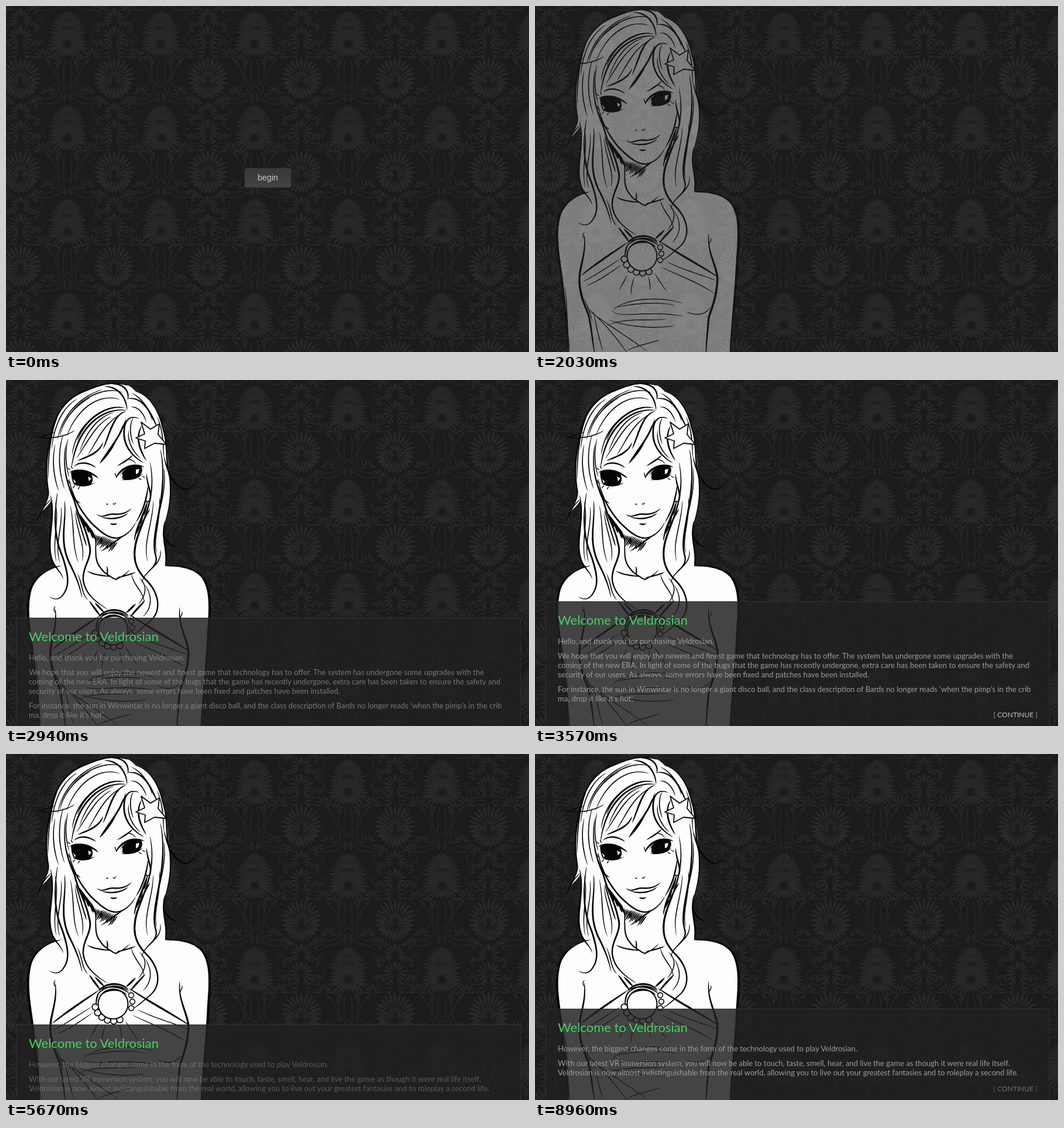
Animation, 894 px wide and 591 px high, one loop 9.03 s. Source, as an HTML page:

```html
<!DOCTYPE html>
<html lang="en">
<head>
<meta charset="utf-8">
<title>Welcome</title>
<style>
  html, body { margin: 0; width: 100%; height: 100%; overflow: hidden; background: #1b1b1b; }
  #stage { position: absolute; left: 0; top: 0; width: 894px; height: 591px; overflow: hidden; }
  svg { position: absolute; left: 0; top: 0; }
  #begin {
    position: absolute; left: 408px; top: 277px; width: 79px; height: 33px; border-radius: 4px;
    background: linear-gradient(#383838, #434343); color: #c6c6c6; text-align: center;
    font: 14.4px/33px "Liberation Sans", Arial, sans-serif;
  }
  #panel {
    position: absolute; left: 18px; width: 862px; height: 240px; box-sizing: border-box;
    border: 1px solid #303030; background: rgba(33, 33, 33, .84);
    font: 13px/16px Lato, sans-serif; color: #9c9c9c; white-space: nowrap;
  }
  h1 { position: absolute; left: 20px; top: 18px; margin: 0; font: 22px/26px Lato, sans-serif; color: #45d163; }
  .page { position: absolute; left: 20px; top: 59px; }
  p { margin: 0 0 9px; }
  #next { position: absolute; right: 35px; top: 564px; font: 12px/16px Lato, sans-serif; color: #999; }
  #next b { font-weight: normal; color: #ccc; }
  #next.hover, #next.hover b { color: #fff; }
</style>
</head>
<body>
<div id="stage">
  <svg width="894" height="591">
    <defs>
      <g id="half"></g>
      <g id="motif">
        <use href="#half"/>
        <use href="#half" transform="translate(160) scale(-1 1)"/>
      </g>
      <pattern id="damask" x="25" y="0" width="160" height="160" patternUnits="userSpaceOnUse">
        <use href="#motif"/>
        <use href="#motif" y="-160"/>
        <use href="#motif" y="160"/>
      </pattern>
      <pattern id="weave" width="4" height="4" patternUnits="userSpaceOnUse">
        <path d="M0 0h1v1h-1zM2 2h1v1h-1z" fill="#111" opacity=".45"/>
      </pattern>
    </defs>
    <rect width="894" height="591" fill="#1c1c1c"/>
    <rect width="894" height="591" fill="url(#damask)"/>
    <rect width="894" height="591" fill="url(#weave)"/>
    <g id="girl">
      <path fill="#fdfdfd" d="M205 9C185 2 160 8 140 17C105 28 85 55 78 90C70 125 66 155 73 192C71 206 66 216 62 224
        C70 216 76 210 78 204C84 240 70 270 78 300C80 310 84 316 88 320C62 322 45 342 40 362C34 390 40 430 46 470
        C50 510 55 550 57 592L333 592C336 540 344 480 346 430C350 390 350 355 336 335C322 320 300 318 272 318
        C276 290 268 270 270 250C280 220 284 200 280 165C276 140 278 110 268 80C262 50 240 22 222 20C215 12 210 9 205 9Z"/>
      <g id="ink" fill="#050505"></g>
    </g>
  </svg>
  <div id="begin">begin</div>
  <div id="panel">
    <h1>Welcome to Veldrosian</h1>
    <div class="page">
      <p>Hello, and thank you for purchasing Veldrosian.</p>
      <p>We hope that you will enjoy the newest and finest game that technology has to offer. The system has undergone some upgrades with the<br>
        coming of the new ERA. In light of some of the bugs that the game has recently undergone, extra care has been taken to ensure the safety and<br>
        security of our users. As always, some errors have been fixed and patches have been installed.</p>
      <p>For instance, the sun in Winwintar is no longer a giant disco ball, and the class description of Bards no longer reads ‘when the pimp’s in the crib<br>
        ma, drop it like it’s hot’.</p>
    </div>
    <div class="page">
      <p>However, the biggest changes come in the form of the technology used to play Veldrosian.</p>
      <p>With our latest VR immersion system, you will now be able to touch, taste, smell, hear, and live the game as though it were real life itself.<br>
        Veldrosian is now almost indistinguishable from the real world, allowing you to live out your greatest fantasies and to roleplay a second life.</p>
    </div>
  </div>
  <div id="next">[ <b>CONTINUE</b> ]</div>
</div>
<script>
const $ = id => document.getElementById(id);
const NS = 'http://www.w3.org/2000/svg';
const add = (parent, tag, attrs) => {
  const el = document.createElementNS(NS, tag);
  for (const k in attrs) el.setAttribute(k, attrs[k]);
  return parent.appendChild(el);
};

// Wallpaper: fans of leaves, left half of one tile
const leaf = (x, y, deg, len, w) => {
  const a = deg * Math.PI / 180, c = Math.cos(a), s = -Math.sin(a);
  const mx = x + c * len * .6, my = y + s * len * .6;
  return `M${x} ${y}Q${mx - s * w} ${my + c * w} ${x + c * len} ${y + s * len}Q${mx + s * w} ${my - c * w} ${x} ${y}`;
};
const fan = (x, y, from, to, n, l0, l1, w, gap = 5) => {
  let d = '';
  for (let i = 0; i < n; i++) {
    const u = i / (n - 1), deg = from + (to - from) * u, a = deg * Math.PI / 180;
    d += leaf(x + gap * Math.cos(a), y - gap * Math.sin(a), deg, l0 + (l1 - l0) * u, w);
  }
  return d;
};
const bloom =
  fan(80, 64, 90, 196, 10, 22, 31, 4.2) + fan(80, 46, 96, 178, 7, 16, 25, 4, 9) + fan(80, 32, 90, 172, 6, 14, 17, 3.6, 8) +
  fan(80, 20, 90, 200, 5, 8, 8, 3, 3) + fan(80, 66, 200, 262, 5, 30, 16, 4) +
  fan(0, 124, 90, -90, 13, 24, 20, 4.6, 14) + fan(0, 136, 40, -80, 8, 18, 12, 4, 12) + fan(0, 124, 78, -50, 6, 12, 12, 3, 3);
const sprigs =
  fan(0, 22, 85, -40, 6, 13, 14, 3.4) + fan(0, 54, 85, -60, 7, 16, 17, 3.4) + fan(0, 78, 60, -40, 4, 12, 14, 3) +
  fan(24, 36, 150, -60, 6, 9, 9, 2.6, 2) + fan(27, 66, 190, 10, 6, 9, 9, 2.6, 2) + fan(20, 8, 170, -40, 6, 9, 10, 2.8, 2) +
  fan(38, 86, 190, -40, 8, 12, 14, 3.2, 3) + fan(58, 94, 130, -60, 6, 10, 12, 3, 2) +
  fan(46, 150, 170, 0, 6, 11, 12, 3.2, 3) + fan(28, 162, 200, 10, 6, 9, 9, 2.8, 2) + fan(80, 156, 130, 230, 4, 8, 9, 2.6, 2);
add($('half'), 'path', { fill: '#292929', d: bloom + sprigs });
add($('half'), 'path', { fill: 'none', stroke: '#272727', 'stroke-width': 1.6, d:
  'M70 90C58 106 64 124 70 134M76 92C70 112 76 122 72 138M34 156C52 164 68 152 66 138C64 128 52 134 57 142' +
  'M80 136C72 138 72 150 64 156M12 30C26 24 32 40 22 44M14 72C28 80 34 70 28 62M8 84C18 90 30 84 40 88' +
  'M44 96C58 100 60 120 64 130M30 164C44 172 58 166 70 158M34 12C44 20 34 30 28 24M32 50C44 50 42 64 34 62' });

// Ink: every stroke is a tapered brush line
const probe = document.createElementNS(NS, 'path');
const brush = (d, w) => {
  probe.setAttribute('d', d);
  const len = probe.getTotalLength(), n = Math.max(6, Math.ceil(len / 5)), left = [], right = [];
  for (let i = 0; i <= n; i++) {
    const u = i / n, p = probe.getPointAtLength(u * len);
    const a = probe.getPointAtLength(Math.max(0, u * len - 1)), b = probe.getPointAtLength(Math.min(len, u * len + 1));
    const h = Math.hypot(b.x - a.x, b.y - a.y) || 1;
    const r = (.25 + w * Math.sqrt(Math.sin(Math.PI * u) + 1e-9)) / 2;
    const nx = (a.y - b.y) / h * r, ny = (b.x - a.x) / h * r;
    left.push([p.x + nx, p.y + ny]);
    right.unshift([p.x - nx, p.y - ny]);
  }
  return 'M' + left.concat(right).map(q => q.map(v => v.toFixed(1)).join(' ')).join('L') + 'Z';
};
const ink = (w, d) => add($('ink'), 'path', { d: d.split('M').slice(1).map(s => brush('M' + s, w)).join('') });
const hatch = (x, y, dx, dy, lx, ly, n) => {
  let d = '';
  for (let i = 0; i < n; i++) d += `M${x + dx * i} ${y + dy * i}l${lx * (1 - .3 * (i % 3) / 2)} ${ly * (1 - .3 * (i % 3) / 2)}`;
  return d;
};
const dot = (cx, cy, r, w) => add($('ink'), 'circle', { cx, cy, r, fill: '#fdfdfd', stroke: '#050505', 'stroke-width': w });

// Shoulders and arms
ink(4, `M96 317C66 322 46 340 41 362C33 395 41 430 46 470C51 510 55 550 58 596
  M272 318C300 316 324 322 336 337C351 358 349 392 346 430C344 480 337 540 333 596`);
ink(3.4, `M84 390C88 420 78 440 76 462C75 490 84 508 91 526C97 550 98 575 103 598
  M297 388C294 420 309 440 312 464C311 495 303 514 297 532C295 555 293 575 292 598`);
ink(1.2, `M51 478C56 515 54 555 60 590M86 398C80 395 82 388 85 386M300 395C303 398 299 404 297 407`);
// Crown and outer hair
ink(2.4, `M205 9C185 2 160 8 140 17C105 28 85 55 78 90C70 125 66 155 73 192C72 208 62 218 57 232
  M167 11C190 10 206 28 207 52M180 7C200 5 212 18 208 34M207 32C240 26 252 70 262 88
  M222 20C244 24 262 52 268 82C278 110 272 140 280 165C284 200 278 225 270 250
  M270 130C277 165 290 181 303 186C312 188 319 184 322 176M268 262C274 276 280 283 292 286`);
ink(1.5, `M200 22C176 10 132 26 110 58M196 34C160 20 120 50 104 96M166 16C130 26 96 58 88 102
  M52 97C75 101 100 98 118 86M60 97C72 92 76 92 84 89M78 203C64 215 58 228 53 242
  M122 32C98 46 82 76 78 118M214 22C232 30 246 50 250 70M212 46C226 44 236 58 240 72
  M145 30C120 42 98 66 92 96M88 64C76 90 72 130 72 170M258 62C270 90 268 112 270 132`);
// Fringe
ink(2.6, `M207 52C170 46 122 74 112 150M204 48C174 40 134 66 122 104M206 53C184 58 178 90 166 118
  M166 106C160 124 142 130 122 138M205 66C196 98 176 118 160 143M190 98C184 114 170 132 160 143
  M228 66C214 60 206 66 203 78C198 104 208 126 236 142M232 78C222 96 226 116 240 138`);
ink(1.5, `M186 55C156 62 136 92 126 122M196 58C166 76 156 104 140 128M180 62C150 78 138 110 120 134
  M152 62C128 78 116 104 113 128M210 86C206 104 218 124 230 134M218 64C210 76 212 96 218 110
  M200 76C194 96 182 112 172 124M106 100C100 124 102 146 108 166M98 92C88 124 90 156 100 186M84 110C78 140 82 166 90 190`);
// Long locks
ink(2.7, `M102 110C96 150 104 176 117 206C124 236 136 250 142 280C150 302 130 318 132 342C136 366 152 378 174 392
  M76 196C86 236 68 272 78 306C82 320 94 326 98 340M88 192C82 232 82 268 96 300C106 330 110 350 98 366C92 376 82 376 74 370
  M100 206C104 244 90 272 108 312C118 332 126 350 130 372M264 118C280 200 244 262 256 300C262 322 234 326 232 348
  M246 140C258 196 236 236 224 270C214 304 222 324 240 342C262 364 268 396 244 414C232 424 222 434 210 438
  M272 240C264 270 278 290 272 318`);
ink(1.4, `M110 214C118 256 112 282 124 312M118 226C122 262 136 282 130 310M94 216C98 250 82 280 92 312
  M84 208C92 240 78 276 86 310M122 330C132 352 128 362 140 376M238 230C230 262 216 280 222 312
  M252 206C250 250 234 276 242 310M262 200C266 236 250 270 258 296M228 338C248 356 232 376 226 384
  M238 350C252 372 248 392 234 404M270 150C274 186 264 214 260 236M264 290C266 310 252 318 246 326M214 330C218 352 236 362 236 380`);
// Face
ink(2.4, `M108 168C113 204 136 236 152 250C166 263 178 271 190 270C206 267 216 255 222 243M243 180C240 208 232 228 222 243
  M108 180C112 196 116 206 128 211M240 160C242 184 250 192 246 206C240 212 238 206 238 200`);
ink(2.2, `M116 148C124 139 142 140 154 150M190 147C202 140 210 135 217 128
  M155 229C164 238 174 228 183 229C196 230 206 228 215 219M163 234C178 239 198 237 209 227M178 245C182 247 186 247 190 245`);
ink(3.4, `M108 158C122 151 144 155 158 168M188 168C194 152 216 140 237 149`);
ink(1.2, `M171 211C172 213 174 213 175 211M182 211C185 213 187 212 188 209M112 178C106 176 108 172 106 170M118 180l-4 5M126 182l-3 5
  M232 164l6 3M226 167l6 4M205 136C212 134 220 138 222 144M190 167C186 164 188 160 186 158M110 154l-5 -4M114 152l-3 -5
  M113 176C122 183 142 182 152 175M196 170C210 172 226 168 234 160`);
add($('ink'), 'path', { d: `M111 158C122 153 138 154 146 161C150 169 148 176 143 180C133 183 121 182 116 177C112 172 112 164 111 158Z
  M195 164C200 152 216 143 231 148C235 153 232 160 228 165C220 171 206 172 200 169Z` });
add($('ink'), 'path', { fill: '#fdfdfd', d: 'M140 165l6 3l-4 5zM114 169l5 4l-1 4zM222 153l6 -1l-2 7l-4 2zM194 165l5 -6l0 8z' });
// Neck and its shading
ink(2, `M152 262C156 292 148 306 164 324C170 332 178 334 186 341C196 338 204 332 212 324M138 326C152 334 168 334 180 336
  M190 338C204 334 214 332 222 328M172 318C176 326 170 330 176 336M186 341C190 343 190 336 196 336`);
ink(1.8, hatch(152, 264, 2.6, .6, 3, 16, 5) + hatch(167, 266, 2.4, 1, -14, 19, 11) + hatch(192, 273, 4, -3, -30, 20, 4) +
  hatch(119, 222, 1.2, 4, 8, 26, 10) + hatch(126, 228, 2.4, 3.2, 8, 24, 10) +
  hatch(242, 206, -2, 5, -5, 24, 10) + hatch(246, 220, -2.2, 4, -10, 18, 9));
// Dress and pendant
ink(3, `M78 461C104 440 132 422 158 404M210 400C246 424 284 444 313 463M142 377C150 388 156 396 162 404
  M152 380C158 388 164 392 168 398M238 376C228 388 220 394 212 406M222 382C214 390 210 394 205 398M157 406C168 390 198 388 210 404`);
for (let i = 0; i < 6; i++) {
  const a = (68 + i * 20) * Math.PI / 180;
  dot(183 + 31 * Math.cos(a), 426 + 30 * Math.sin(a), 5.4, 1.7);
}
for (let i = 0; i < 3; i++) dot(214 + 2 * (i % 2), 412 + 11 * i, 4.4, 1.6);
dot(183, 427, 25.5, 2);
ink(2.2, `M156 412C168 394 196 392 210 406M160 414C172 400 196 400 207 412M158 404C176 394 196 396 212 410M154 430C154 418 156 410 162 404`);
ink(1.2, `M146 432C124 446 100 462 80 472M148 442C128 456 108 470 88 478M158 460C152 470 148 478 144 486M170 463C166 474 164 482 164 494
  M194 462C196 470 196 476 198 486M204 456C212 468 216 476 226 488M216 446C240 458 276 470 308 492M224 436C250 450 282 458 312 470
  M132 522C146 500 212 494 254 508M134 516C164 508 214 504 242 512M132 520C140 536 190 518 254 530
  M122 546C160 530 196 540 226 534M124 536C160 548 200 552 240 546M88 514C112 536 132 556 160 596M92 520C126 546 160 566 192 590
  M156 590C166 582 190 578 214 570M100 522C104 545 110 570 116 590M258 522C276 530 292 528 300 514M84 500C90 514 94 520 98 540`);
// Star clip
add($('ink'), 'path', { fill: '#fdfdfd', stroke: '#050505', 'stroke-width': 1.8, 'stroke-linejoin': 'round',
  d: 'M231 72L247 84L262 75L260 93L274 110L254 108L237 117L238 104L222 99L237 92Z' });

// Timeline
const LOOP = 9030, TICK = 70;
const pages = document.querySelectorAll('.page');
const ease = (t, a, b) => .5 - Math.cos(Math.PI * Math.min(1, Math.max(0, (t - a) / (b - a)))) / 2;
const pulse = (t, start) => t < start ? 1 : .73 + .27 * Math.cos((t - start) / 1840 * 2 * Math.PI);

function draw(t) {
  $('begin').style.display = t < 840 ? '' : 'none';
  $('begin').style.color = t < 420 ? '' : '#fff';
  $('girl').style.opacity = ease(t, 1740, 2380);

  const top = 591 - 185 * ease(t, 2470, 2800) - 28 * ease(t, 3030, 3160) + 28 * ease(t, 4620, 4760)
    + 122 * ease(t, 5000, 5180) - 66 * ease(t, 5270, 5560) - 27 * ease(t, 5790, 5950);
  $('panel').style.top = top + 'px';
  pages[0].style.opacity = ease(t, 2790, 3030) - ease(t, 4790, 5010);
  pages[1].style.opacity = ease(t, 5570, 5780);

  const hover = t >= 4270 && t < 5200;
  const shown = t < 5200 ? ease(t, 3150, 3290) - ease(t, 4420, 4640) : ease(t, 5940, 6090);
  $('next').className = hover ? 'hover' : '';
  $('next').style.opacity = shown * (hover ? 1 : pulse(t, t < 5200 ? 3380 : 6310));
}

const start = performance.now();
function frame(now) {
  const t = Math.max(0, now - start) % LOOP;
  draw(Math.floor(t / TICK) * TICK);
  requestAnimationFrame(frame);
}
draw(0);
requestAnimationFrame(frame);
</script>
</body>
</html>
```
